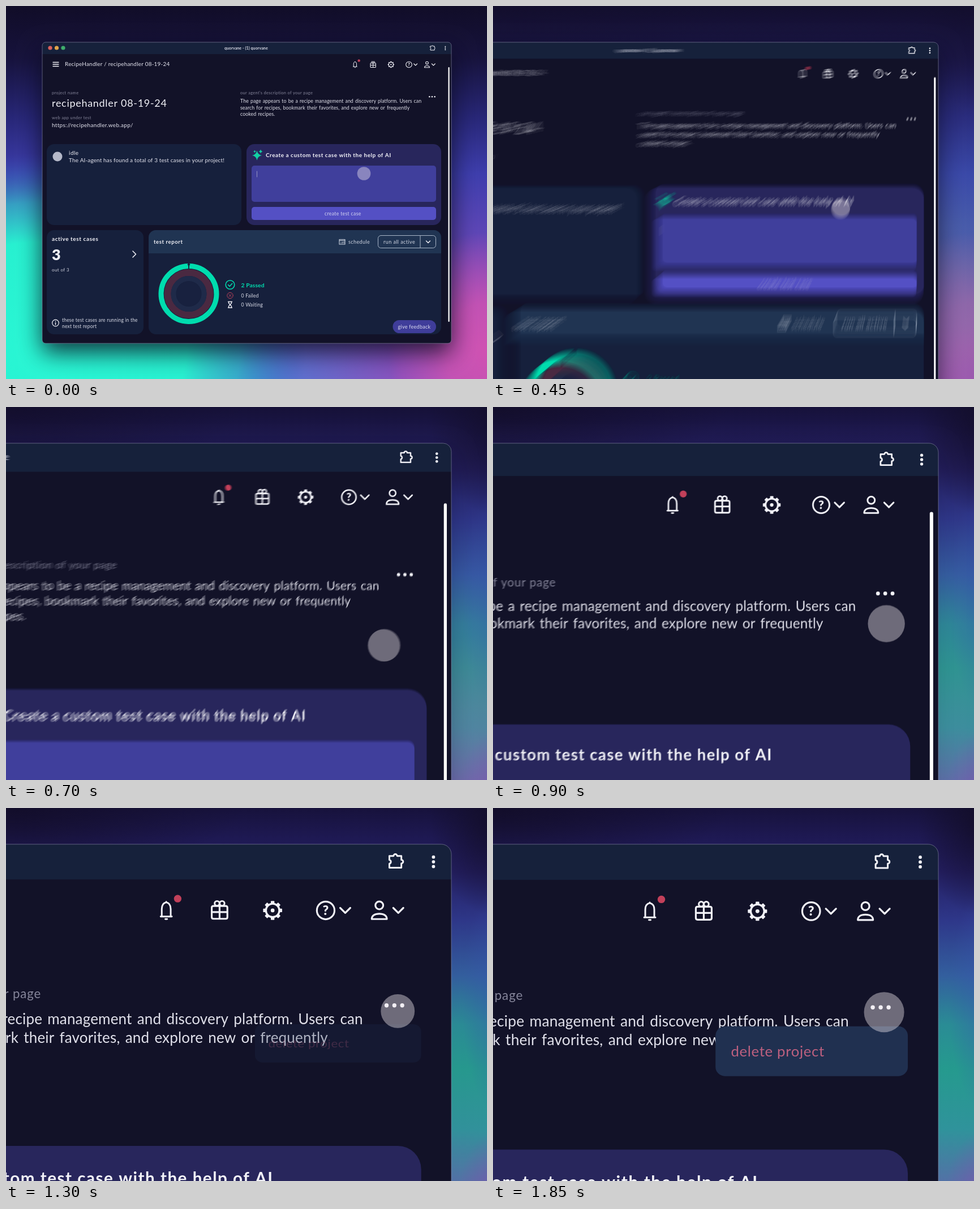
An HTML page with a canvas for the animation above (1.9 s loop, 850 px wide and 659 px high).

```html
<!DOCTYPE html>
<html lang="en">
<head>
<meta charset="utf-8">
<title>Delete a project</title>
<style>
  html, body { margin: 0; width: 100%; height: 100%; overflow: hidden; background: #120e2a; }
  canvas { display: block; width: 850px; height: 659px; }
</style>
</head>
<body>
<canvas id="stage" width="850" height="659"></canvas>
<script>
const W = 850, H = 659, LOOP = 1900, STEP = 50, SHUTTER = 12;
const RIGHT = 787, TOP = 64; // the zoom is anchored to the window's top right corner
const FONT = 'Lato, "Open Sans", sans-serif';
const WHITE = '#f2f2f8', GREEN = '#00dcae', CARD = '#16203c', PAGE = '#121228';

const out = document.getElementById('stage').getContext('2d');
const layer = document.createElement('canvas');
layer.width = W;
layer.height = H;
const c = layer.getContext('2d');

// ---- motion ----
const clamp = v => Math.max(0, Math.min(1, v));
const smooth = v => { v = clamp(v); return v * v * (3 - 2 * v); };

// overdamped spring, 0 to 1
function zoomed(t) {
  const u = Math.max(0, t - 335), slow = 220, fast = 80;
  return 1 - (slow * Math.exp(-u / slow) - fast * Math.exp(-u / fast)) / (slow - fast);
}
const scaleAt = t => 1 + 2 * zoomed(t);

function pointerAt(t) {
  const u = Math.max(0, t - 250);
  const press = t < 1290 ? (t - 1290) / 70 : (t - 1290) / 130;
  return {
    x: 755 - 122.5 * Math.exp(-((u / 336) ** 2.3)),
    y: 163 + 133 * Math.exp(-((u / 450) ** 2)),
    r: 11.85 - 1.75 * Math.exp(-press * press)
  };
}

// ---- drawing helpers ----
function box(x1, y1, x2, y2, r, fill) {
  c.beginPath();
  c.roundRect(x1, y1, x2 - x1, y2 - y1, r);
  c.fillStyle = fill;
  c.fill();
}
function dot(x, y, r, fill) {
  c.beginPath();
  c.arc(x, y, r, 0, 7);
  c.fillStyle = fill;
  c.fill();
}
function ring(x, y, r, width, color, from = 0, to = Math.PI * 2) {
  c.beginPath();
  c.arc(x, y, r, from, to);
  c.lineWidth = width;
  c.strokeStyle = color;
  c.stroke();
}
function path(d, width, color = WHITE) {
  c.lineWidth = width;
  c.strokeStyle = color;
  c.stroke(new Path2D(d));
}
function text(str, x, y, size, gap, color = WHITE, weight = 400) {
  c.font = `${weight} ${size}px ${FONT}`;
  c.letterSpacing = gap + 'px';
  c.fillStyle = color;
  c.fillText(str, x, y);
}
function fade(gradient, stops) {
  stops.forEach(([at, color]) => gradient.addColorStop(at, color));
  return gradient;
}
function glow(x, y, rx, ry, stops) {
  c.save();
  c.translate(x, y);
  c.scale(rx, ry);
  c.fillStyle = fade(c.createRadialGradient(0, 0, 0, 0, 0, 1), stops);
  c.fillRect(-1, -1, 2, 2);
  c.restore();
}

// ---- backdrop ----
function backdrop(p) {
  c.fillStyle = fade(c.createLinearGradient(0, 0, 0, H), [
    [0, '#110d28'], [.14, '#16123c'], [.3, '#272677'], [.45, '#3d3dac'],
    [.6, '#5b45b5'], [.8, '#7f4bba'], [1, '#8a4fbc']]);
  c.fillRect(0, 0, W, H);
  glow(440, 660, 260, 160, [[0, 'rgba(65,130,215,.9)'], [1, 'rgba(65,130,215,0)']]);
  glow(845, 610, 170, 210, [[0, '#cf52b2'], [.4, 'rgba(205,82,178,.85)'], [1, 'rgba(205,82,178,0)']]);
  glow(60, 610, 470, 350, [[0, '#29f6d4'], [.55, '#27f0d0'], [.75, 'rgba(45,190,200,.75)'], [1, 'rgba(50,80,180,0)']]);

  c.globalAlpha = p ** .7;
  c.fillStyle = fade(c.createLinearGradient(0, 0, 0, H), [
    [0, '#17123c'], [.08, '#1e1953'], [.17, '#241f63'], [.3, '#2e3789'], [.45, '#335f9e'],
    [.58, '#2a8c95'], [.7, '#259a8e'], [.86, '#2f939b'], [1, '#5272a6']]);
  c.fillRect(0, 0, W, H);
  glow(0, 0, 420, 120, [[0, 'rgba(18,13,40,.9)'], [1, 'rgba(18,13,40,0)']]);
  glow(860, 20, 110, 170, [[0, 'rgba(18,13,40,.9)'], [1, 'rgba(18,13,40,0)']]);
  glow(870, 340, 65, 200, [[0, 'rgba(56,84,176,.5)'], [1, 'rgba(56,84,176,0)']]);
  glow(870, 680, 70, 110, [[0, 'rgba(130,80,176,.7)'], [1, 'rgba(130,80,176,0)']]);
  c.globalAlpha = 1;
}

// ---- header icons, drawn at three times the window's unit ----
function headerIcons() {
  c.save();
  c.translate(RIGHT, TOP);
  c.scale(1 / 3, 1 / 3);
  c.translate(-RIGHT, -TOP);
  c.lineCap = c.lineJoin = 'round';

  path('M676 85h7.500a3.200 3.200 0 0 1 6.400 0h7.600v7a3.200 3.200 0 0 1 0 6.400v7.600h-21.500v-7a3.600 3.600 0 0 0 0-7z', 3);
  [87, 95.5, 104].forEach(y => dot(755, y, 2.9, WHITE));

  path('M268.500 193v-13c0-8 3-11 8-12c5 1 8 4 8 12v13M266.500 193.500h20M276.500 167v1', 3);
  path('M275 198h3', 3);
  dot(297, 161.500, 6.7, '#c2405a');

  path('M361 174.500h22q3 0 3 3v17q0 3-3 3h-22q-3 0-3-3v-17q0-3 3-3zM358 185.500h28M372 174.500v23', 3.2);
  ring(367.5, 170, 4.3, 3, WHITE);
  ring(376.5, 170, 4.3, 3, WHITE);

  ring(467, 182.500, 12, 3.4, WHITE);
  for (let i = 0; i < 8; i++) {
    c.save();
    c.translate(467, 182.500);
    c.rotate(i * Math.PI / 4);
    box(-3.2, -17, 3.2, -12, 1, WHITE);
    c.restore();
  }
  dot(467, 182.500, 3.4, WHITE);

  ring(562, 182.500, 15.800, 3.2, WHITE);
  text('?', 556.500, 190.500, 23, 0, WHITE, 900);
  ring(658, 173.500, 7, 3.2, WHITE);
  path('M644.500 198c0-6 5-9.500 13.500-9.500s13.500 3.500 13.500 9.500z', 3.2);
  path('M588 178l9 9l9-9M683 178l9 9l9-9', 3.3);

  [671, 685, 699].forEach(x => dot(x, 352.500, 3.7, WHITE));
  c.restore();
}

function header() {
  c.fillStyle = '#16213b';
  c.fillRect(64, 64, 723, 21);
  ['#d9605c', '#dfa54a', '#3fae6c'].forEach((color, i) => dot(78 + i * 11.500, 74, 3.6, color));
  text('quorvane - (1) quorvane', 386, 76.500, 7, .1, '#d8dae6', 700);
  path('M83 99.500h10M83 103h10M83 106.500h10', 1.3);
  text('RecipeHandler / recipehandler 08-19-24', 104, 106, 10, .19, '#e4e4ee');
  headerIcons();

  const dim = '#85859a';
  text('project name', 81, 156, 7.5, .37, dim);
  text('recipehandler 08-19-24', 81, 178, 18, .7);
  text('web app under test', 81, 199.500, 7.5, .33, dim);
  text('https://recipehandler.web.app/', 81, 213.500, 10, .3, '#e4e4ee');
  text("our agent's description of your page", 414, 155.700, 7.5, .285, dim);
  c.wordSpacing = '.8px';
  ['The page appears to be a recipe management and discovery platform. Users can',
    'search for recipes, bookmark their favorites, and explore new or frequently',
    'cooked recipes.'].forEach((line, i) => text(line, 414, 171.400 + i * 11.1, 8.8, .05, '#e0e0ea'));
  c.wordSpacing = '0px';
}

function star(x, y, r) {
  const q = r * .16;
  c.fill(new Path2D(`M${x} ${y - r}Q${x + q} ${y - q} ${x + r} ${y}Q${x + q} ${y + q} ${x} ${y + r}` +
    `Q${x - q} ${y + q} ${x - r} ${y}Q${x - q} ${y - q} ${x} ${y - r}z`));
}

function cards() {
  box(72, 244, 416, 387, 13, CARD);
  dot(91, 266, 8.5, '#b4b8c8');
  text('idle', 111, 262.500, 10, .5);
  text('The AI-agent has found a total of 3 test cases in your project!', 111, 276, 10, .12, '#e4e4ee');

  box(425, 244, 769, 387, 14, '#28265c');
  c.fillStyle = '#12cfa4';
  star(443.500, 264, 8.5);
  star(450, 257, 3.5);
  star(439.500, 257, 2.6);
  text('Create a custom test case with the help of AI', 459, 267, 10, .51, WHITE, 700);
  box(434, 282, 760, 346, 5, '#403f9c');
  path('M443.500 292v10', .8, '#a9a9cc');
  box(434, 355, 760, 378, 5, '#5450c4');
  text('create test case', 563, 369.500, 8.5, .4, '#d8d8f2');

  box(72, 396, 243, 580, 13, CARD);
  text('active test cases', 81, 415, 10, .58, WHITE, 700);
  text('3', 81, 449, 27, 0, WHITE, 900);
  text('out of 3', 81, 468.500, 8, .4, '#d0d2de');
  path('M224 433l5.500 5.500l-5.500 5.500', 1.5);
  ring(87.500, 560, 5.8, 1.2, WHITE);
  path('M87.500 559.500v3.500M87.500 557v.2', 1.4);
  text('these test cases are running in the', 99, 557.500, 8.5, .19, '#d8dae6');
  text('next test report', 99, 568.500, 8.5, .19, '#d8dae6');
}

function report() {
  box(252, 396, 769, 580, 13, CARD);
  box(252, 396, 769, 437, [13, 13, 0, 0], '#203452');
  text('test report', 261, 420, 9.5, .6, WHITE, 700);
  path('M589 412.500h10v8.500h-10zM589 414.500h10M592 418v1M594.500 417v2M597 416.500v2.500', 1.1, '#d0d6e2');
  text('schedule', 605, 420, 9, .4, '#d0d6e2');
  c.beginPath();
  c.roundRect(657.500, 405.500, 102, 22, 5);
  c.lineWidth = 1;
  c.strokeStyle = '#a9b6c8';
  c.stroke();
  path('M732 405.500v22', 1, '#a9b6c8');
  text('run all active', 667, 420, 9, .44, '#d0d6e2');
  path('M742.500 415l3.500 3.500l3.500-3.500', 1.4);

  const x = 323, y = 508.500, top = -Math.PI / 2;
  ring(x, y, 37.500, 12, '#4a2941');
  ring(x, y, 27, 9, '#1f2a49');
  dot(x, y, 22, '#18213f');
  c.lineCap = 'butt';
  ring(x, y, 49, 9, GREEN, top + .02, top + Math.PI * 2 - .02);
  path('M323 453l-2 4.500h4z', 1, CARD);
  c.lineCap = 'round';

  ring(396, 492.500, 7.8, 1.6, GREEN);
  path('M392.500 492.500l2.700 2.800l4.500-5', 1.6, GREEN);
  text('2 Passed', 415.500, 496.500, 10.3, .1, GREEN, 700);
  ring(396, 511.500, 5.2, 1, '#b8405a');
  path('M394 509.500l4 4M398 509.500l-4 4', 1, '#b8405a');
  text('0 Failed', 415.500, 514.800, 8.7, .2, '#d8dae6');
  path('M392.500 522.500h7M392.500 533h7M393.500 523v2l2.500 2.800l2.500-2.800v-2M393.500 532.500v-2l2.500-2.800l2.500 2.800v2', 1.3);
  text('0 Waiting', 415.500, 531, 8.7, .2, '#d8dae6');

  box(683.500, 555, 760, 578, 11.5, '#3f3d9a');
  text('give feedback', 692.500, 569.500, 9, .27, '#dcdcf2');
}

function scrollbar(t) {
  c.globalAlpha = 1 - smooth((t - 1000) / 200);
  box(781.500, 108, 783.700, 558, 1, '#ffffff');
  c.globalAlpha = 1;
}

function menu(t) {
  const alpha = smooth((t - 1230) / 210);
  if (!alpha) return;
  const grow = smooth((t - 1230) / 140);
  c.save();
  c.translate(769, 171.400);
  c.scale(.75 + .25 * grow, .5625 + .4375 * grow);
  c.translate(-769, -171.400);
  c.globalAlpha = alpha;
  box(655.600, 171.400, 769, 200.700, 5.5, '#203050');
  text('delete project', 664.700, 189.300, 8.6, .22, '#bd607f');
  c.restore();
}

function scene(t) {
  const p = zoomed(t), s = scaleAt(t);
  c.setTransform(1, 0, 0, 1, 0, 0);
  backdrop(p);
  c.translate(RIGHT, TOP);
  c.scale(s, s);
  c.translate(-RIGHT, -TOP);

  c.save();
  c.shadowColor = `rgba(8,8,26,${.8 * (1 - p)})`;
  c.shadowBlur = 42;
  c.shadowOffsetY = 16;
  box(64, 64, 787, 596, 6, PAGE);
  c.restore();

  c.save();
  c.beginPath();
  c.roundRect(64, 64, 723, 532, 6);
  c.clip();
  c.lineCap = c.lineJoin = 'round';
  header();
  cards();
  report();
  scrollbar(t);
  menu(t);
  const m = pointerAt(t);
  dot(m.x, m.y, m.r, 'rgba(240,232,238,.41)');
  c.restore();

  c.beginPath();
  c.roundRect(64, 64, 723, 532, 6);
  c.lineWidth = 1 / s;
  c.strokeStyle = 'rgba(150,150,180,.55)';
  c.stroke();
}

// averages several moments inside the shutter to get the zoom blur
function render(t) {
  const open = t - SHUTTER / 2;
  const travel = (scaleAt(t + SHUTTER / 2) - scaleAt(open)) * 790;
  const n = Math.max(1, Math.min(18, Math.ceil(travel / 2.5)));
  for (let i = 0; i < n; i++) {
    scene(n === 1 ? t : open + SHUTTER * (i + .5) / n);
    out.globalAlpha = 1 / (i + 1);
    out.drawImage(layer, 0, 0);
  }
}

const start = performance.now();
let shown = -1;
function tick() {
  const t = Math.floor((performance.now() - start) % LOOP / STEP) * STEP;
  if (t !== shown) render(shown = t);
  requestAnimationFrame(tick);
}
tick();
</script>
</body>
</html>
```
